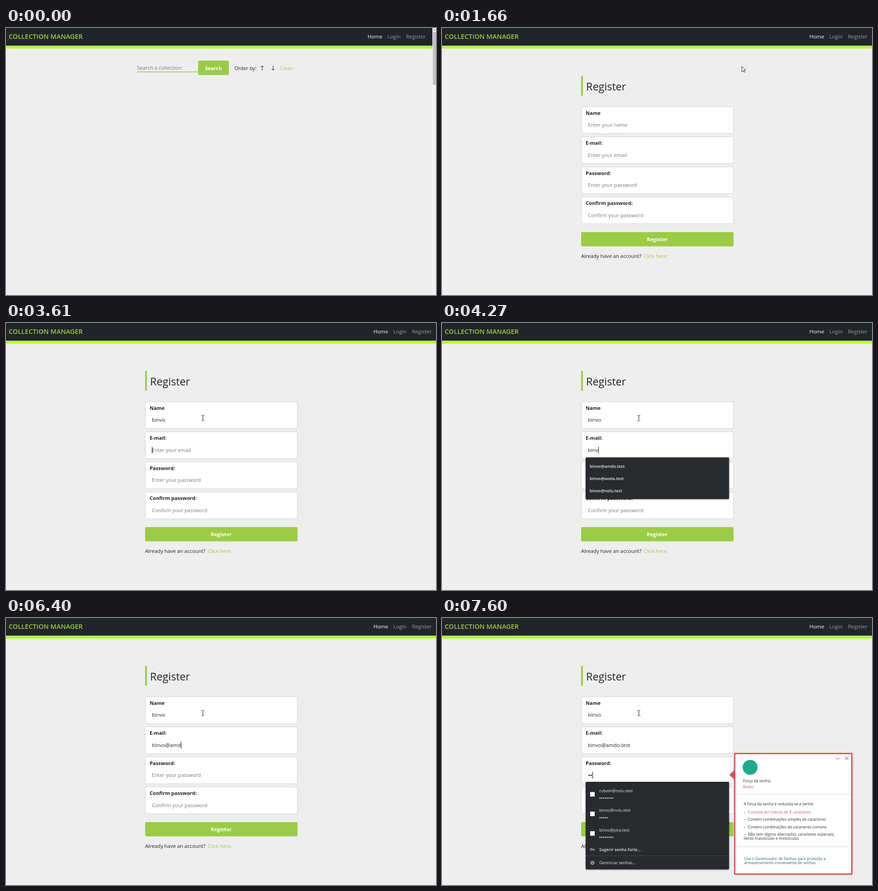
An HTML page that plays this animation: 949x590 px, repeating every 8000 ms.

```html
<!DOCTYPE html>
<html lang="en">
<head>
<meta charset="utf-8">
<title>Register form</title>
<style>
  html, body { margin: 0; height: 100%; overflow: hidden; background: #eee; }
  svg { display: block; width: 100vw; height: 100vh; font-family: "Open Sans", "Noto Sans", sans-serif; }
  .menu { filter: drop-shadow(0 1px 1.5px rgba(0, 0, 0, .4)); }
</style>
</head>
<body>
<svg id="stage" viewBox="0 0 949 590"></svg>
<script>
const LOOP = 8000;
const PAGE_CHANGE = 1460;
const INK = '#212529', HINT = '#75787b', GREEN = '#9ccc46', LIME = '#adff2f';
const MENU = '#292a2d', RED = '#d9534f', MUTED = '#9b9d9f';
const FIELD_SIZE = 11.4, FIELD_X = 322, FIELD_PITCH = 66.45;

const stage = document.getElementById('stage');
const ruler = document.createElement('canvas').getContext('2d');

// Each step is [start time, value].
const typedName = [[2400, ''], [2930, 'b'], [3080, 'bi'], [3210, 'bin'], [3350, 'binv'], [3480, 'binvo']];
const typedEmail = [
  [3610, ''], [3810, 'b'], [3940, 'bi'], [4070, 'bin'], [4270, 'binv'], [4410, 'binvo'],
  [4670, 'binvo@'], [4740, 'binvo@a'], [4930, 'binvo@ar'], [5000, 'binvo@arm'],
  [5800, 'binvo@ar'], [6000, 'binvo@a'], [6260, 'binvo@am'], [6400, 'binvo@amd'],
  [6470, 'binvo@amdo'], [6600, 'binvo@amdo.'], [6670, 'binvo@amdo.t'],
  [6800, 'binvo@amdo.te'], [6870, 'binvo@amdo.tes'], [6940, 'binvo@amdo.test']
];
const typedPassword = [[7070, ''], [7330, '•'], [7600, '••']];

const nameFilter = [[2460, 'b'], [3150, 'bi'], [3420, 'binv'], [3610, null]];
const emailFilter = [[3870, 'binvo'], [4740, 'binvo@a'], [4930, null]];
const knownNames = ['Binvo Tarca Solameira', 'Brul Hostave', 'Bin', 'Binvo', 'binvo', 'Binvo'];
const knownEmails = ['binvo@amdo.test', 'binvo@avela.test', 'binvo@nolu.test'];

const pointerPath = [
  [270, 847, 584], [500, 852, 400], [750, 864, 170], [900, 876, 50], [1060, 905, 16],
  [1460, 905, 16], [1560, 800, 46], [1660, 662, 84], [1800, 550, 136], [2000, 456, 194], [2190, 434, 210]
];

const text = (x, y, size, fill, content, weight = 400, anchor = 'start') =>
  `<text x="${x}" y="${y}" font-size="${size}" fill="${fill}" font-weight="${weight}" text-anchor="${anchor}">${content}</text>`;
const rect = (x, y, w, h, fill, extra = '') =>
  `<rect x="${x}" y="${y}" width="${w}" height="${h}" fill="${fill}" ${extra}/>`;
const line = (d, stroke, width = 1) =>
  `<path d="${d}" fill="none" stroke="${stroke}" stroke-width="${width}"/>`;
const shape = (d, fill, extra = '') => `<path d="${d}" fill="${fill}" ${extra}/>`;
const dots = (x, y, count, pitch, r, fill) => Array.from({ length: count }, (_, i) =>
  `<circle cx="${x + i * pitch}" cy="${y}" r="${r}" fill="${fill}"/>`).join('');

const stepAt = (steps, t) => steps.filter(step => step[0] <= t).pop();

function header(t) {
  const home = t < PAGE_CHANGE;
  const width = home ? 941 : 949, shift = home ? 0 : 13;
  const registerColor = t >= 1000 && home ? '#c8c9ca' : MUTED;
  return rect(0, 0, width, 39, INK) + rect(0, 39.5, width, 6, LIME) +
    text(6, 24, 14.45, GREEN, 'COLLECTION MANAGER', 600) +
    text(798 + shift, 22.5, 11.4, '#fff', 'Home') +
    text(842 + shift, 22.5, 11.4, MUTED, 'Login') +
    text(883 + shift, 22.5, 11.4, registerColor, 'Register');
}

function homePage() {
  return text(289, 92, 11.4, HINT, 'Search a collection') + rect(289, 96.3, 136, 1.5, GREEN) +
    rect(424, 72, 68, 32, GREEN, 'rx="3"') +
    text(458, 92.7, 11, '#fff', 'Search', 700, 'middle') +
    text(504, 92.7, 11.2, INK, 'Order by:') +
    line('M565.5 94V83.5M562 87L565.5 83.5L569 87', INK) +
    line('M589.5 83V93.5M586 90L589.5 93.5L593 90', INK) +
    text(604, 92.7, 11.4, GREEN, 'Clean') +
    rect(941, 0, 8, 590, '#f1f1f1') + rect(942, 9, 7, 116.5, '#c1c1c1') +
    shape('M943 5h5l-2.5-3z', '#a3a3a3');
}

function field(index, label, hint, steps, focusEnd, t) {
  const top = 174 + index * FIELD_PITCH, baseline = top + 44.4;
  const [since, value] = stepAt(steps, t) || [0, ''];
  const masked = value.startsWith('•');
  let out = rect(307.5, top, 335.5, 59.3, '#fff', 'rx="3" stroke="#ced2d6"') +
    text(317, top + 18, 11.1, INK, label, 700);
  if (masked) out += dots(324.8, baseline - 3.6, value.length, 4.5, 1.6, INK);
  else out += text(FIELD_X, baseline, FIELD_SIZE - (value ? 0 : .2), value ? INK : HINT, value || hint);

  const focused = since > 0 && t < focusEnd;
  if (focused && Math.floor((t - since) / 530) % 2 === 0) {
    ruler.font = `${FIELD_SIZE}px "Open Sans", "Noto Sans", sans-serif`;
    const width = masked ? value.length * 4.8 : ruler.measureText(value).width;
    out += rect(Math.round(FIELD_X + width), baseline - 11.4, 1, 15, '#000');
  }
  return out;
}

function registerPage(t) {
  return rect(307, 106, 4, 43.5, GREEN) + text(318, 137.6, 23.3, INK, 'Register') +
    field(0, 'Name', 'Enter your name', typedName, 3610, t) +
    field(1, 'E-mail:', 'Enter your email', typedEmail, 7070, t) +
    field(2, 'Password:', 'Enter your password', typedPassword, LOOP, t) +
    field(3, 'Confirm password:', 'Confirm your password', [], 0, t) +
    rect(307, 451, 336.5, 31.5, GREEN, 'rx="3"') +
    text(475, 471, 11.2, '#fff', 'Register', 700, 'middle') +
    text(307, 508, 11.3, INK, 'Already have an account?') + text(445, 508, 11.3, GREEN, 'Click here.');
}

const menuBox = (top, height) => rect(317, top, 316.5, height, MENU, 'rx="2" class="menu"');

function suggestions(top, entries, filter, t) {
  const step = stepAt(filter, t);
  if (!step || step[1] === null) return '';
  const items = entries.filter(entry => entry.toLowerCase().startsWith(step[1]));
  return menuBox(top, 11 + 27 * items.length) +
    items.map((item, i) => text(326, top + 22.7 + 27 * i, 9.1, '#e8eaed', item, 600)).join('');
}

function passwordMenu() {
  const accounts = [['rubem@nolu.test', 8], ['binvo@nolu.test', 5], ['binvo@pira.test', 8]];
  return menuBox(362, 193.5) +
    accounts.map(([email, length], i) => {
      const y = 385 + 43.3 * i;
      return rect(327, y - .5, 10, 10, '#fff') + text(347, y, 9.15, '#e8eaed', email) +
        dots(348.7, y + 13, length, 4, 1.3, '#e8eaed');
    }).join('') +
    `<circle cx="329.5" cy="511.3" r="2.2" fill="none" stroke="${MUTED}" stroke-width="1.6"/>` +
    line('M332 511.3H337.3M335.5 511V514', MUTED, 1.8) +
    text(347, 515, 9.1, '#e8eaed', 'Sugerir senha forte...', 600) +
    rect(317, 525, 316.5, 1, '#45474a') +
    `<circle cx="332" cy="541" r="3.8" fill="none" stroke="${MUTED}" stroke-width="1.8" stroke-dasharray="2 1"/>` +
    `<circle cx="332" cy="541" r="2.4" fill="none" stroke="${MUTED}" stroke-width="1.8"/>` +
    text(347, 544.4, 9, '#e8eaed', 'Gerenciar senhas...');
}

function strengthPopup() {
  const note = (x, y, content, fill = '#333') => text(x, y, 8.45, fill, content);
  const bullet = (y, content, fill) => note(666, y, '–', fill) + note(675, y, content, fill);
  return shape('M634 346.5L645.5 336V357z', RED) +
    rect(646, 299.5, 258.5, 266.5, '#fff', `stroke="${RED}" stroke-width="3" rx="1"`) +
    line('M869.5 309L873.5 313L877.5 309M889.5 306L897.5 314M897.5 306L889.5 314', '#444') +
    '<circle cx="680" cy="330" r="16.5" fill="#20a890"/>' +
    note(664.5, 362.7, 'Força da senha:') + text(664.5, 376, 8.9, RED, 'Baixo') +
    rect(648, 389, 255, 1, '#ddd') +
    note(666, 413.6, 'A força da senha é reduzida se a senha:') +
    bullet(431.5, 'Consiste em menos de 8 caracteres', RED) +
    bullet(448, 'Contém combinações simples de caracteres') +
    bullet(464.5, 'Contém combinações de caracteres comuns') +
    bullet(481, 'Não tem dígitos alternados, caracteres especiais,') +
    note(666, 490, 'letras maiúsculas e minúsculas') +
    rect(648, 505, 255, 1, '#ddd') +
    note(667, 534.7, 'Use o Gerenciador de Senhas para proteção e', '#2f6668') +
    note(667, 543.7, 'armazenamento conveniente de senhas', '#2f6668');
}

function pointer(t) {
  if (t < pointerPath[0][0]) return '';
  const next = pointerPath.findIndex(point => point[0] > t);
  let [, x, y] = pointerPath[pointerPath.length - 1];
  if (next > 0) {
    const [t0, x0, y0] = pointerPath[next - 1], [t1, x1, y1] = pointerPath[next];
    const k = (t - t0) / (t1 - t0);
    x = x0 + (x1 - x0) * k;
    y = y0 + (y1 - y0) * k;
  }
  const outline = 'stroke="#111" stroke-width=".9" stroke-linejoin="round"';
  let icon;
  if (t >= 1000 && t < PAGE_CHANGE) {
    icon = shape('M-1 0Q.5-1.5 2 0V5L8 6.5Q9.5 7 9 9L8 14H0L-4 8.5Q-4-10-1 9z'.replace('-10', '7'), '#fff', outline);
  } else if (t >= 2140 && !(t >= 7140 && t < 7260)) {
    icon = line('M-2.5-6H-.7L.5-5L1.7-6H3.5M.5-5V5M-2.5 6H-.7L.5 5L1.7 6H3.5', '#111');
  } else {
    icon = shape('M.5.5V12L3.2 9.6L5 13.6L6.9 12.8L5.1 8.9H8.8z', '#fff', outline);
  }
  return `<g transform="translate(${x.toFixed(1)} ${y.toFixed(1)})">${icon}</g>`;
}

function draw(t) {
  let scene = rect(0, 0, 949, 590, '#eee') + header(t);
  if (t < PAGE_CHANGE) scene += homePage();
  else scene += registerPage(t) +
    suggestions(230, knownNames, nameFilter, t) +
    suggestions(297, knownEmails, emailFilter, t);
  if (t >= 7140) scene += passwordMenu();
  if (t >= 7460) scene += strengthPopup();
  return scene + pointer(t);
}

let shown = '';
const start = performance.now();
function tick() {
  const scene = draw((performance.now() - start) % LOOP);
  if (scene !== shown) stage.innerHTML = shown = scene;
  requestAnimationFrame(tick);
}
tick();
</script>
</body>
</html>
```
